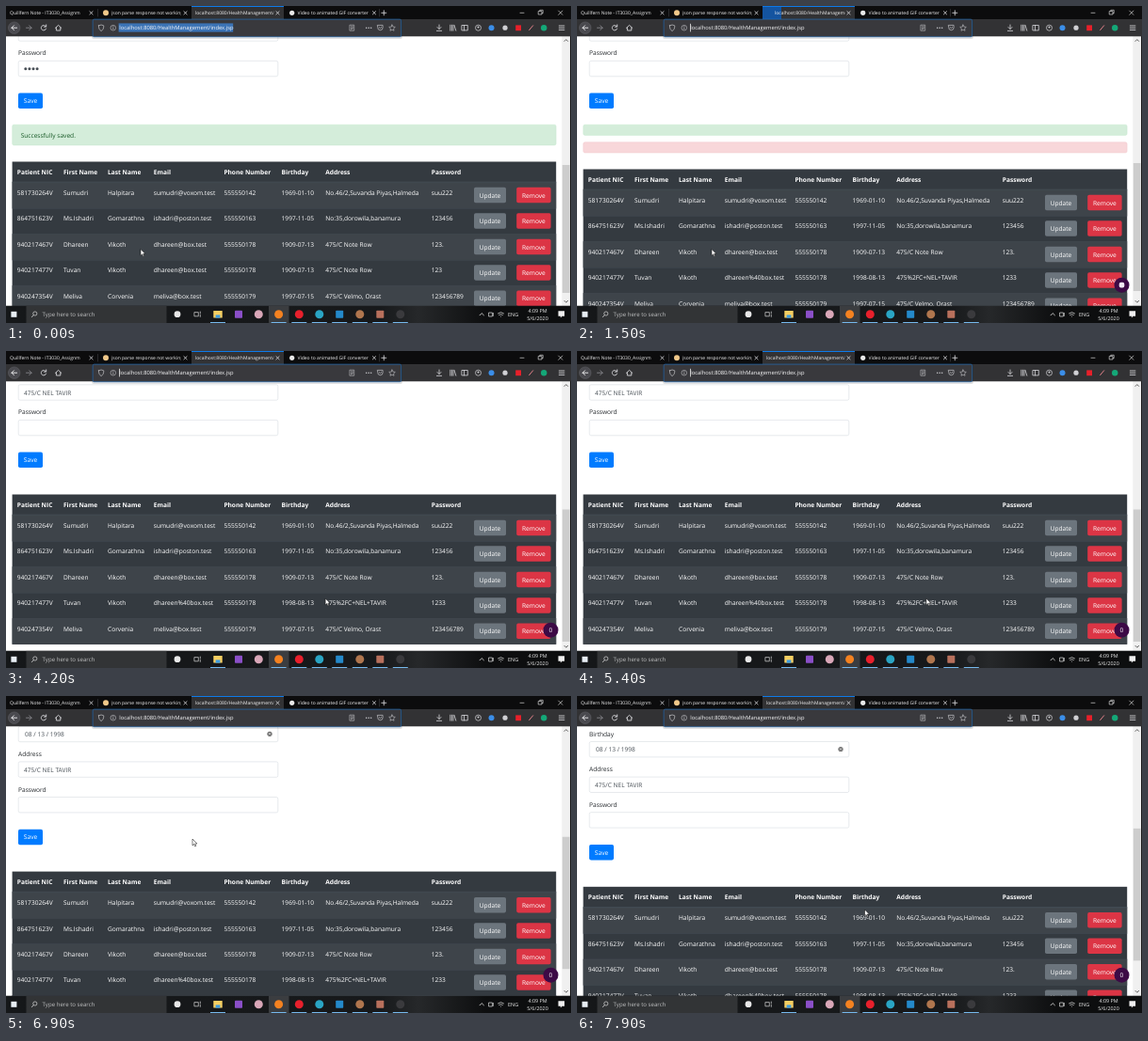
An HTML page for the animation above (8000 ms loop, 600 by 337 pixels).

```html
<!DOCTYPE html>
<html lang="en">
<head>
<meta charset="utf-8">
<title>Patient management</title>
<style>
  html, body { margin: 0; width: 100%; height: 100%; overflow: hidden; background: #fff; }
  svg { display: block; width: 100vw; height: 100vh; }
  text { font-family: "Open Sans", "Noto Sans", sans-serif; text-rendering: geometricPrecision; white-space: pre; }
</style>
</head>
<body>
<svg id="stage" viewBox="0 0 600 337"></svg>
<script>
const LOOP = 8000;
const stage = document.getElementById("stage");

function add(parent, tag, attrs, content) {
  const el = document.createElementNS("http://www.w3.org/2000/svg", tag);
  for (const key in attrs) el.setAttribute(key, attrs[key]);
  if (content !== undefined) el.textContent = content;
  parent.appendChild(el);
  return el;
}
const group = (p, attrs = {}) => add(p, "g", attrs);
const box = (p, x, y, width, height, fill, more = {}) =>
  add(p, "rect", { x, y, width, height, fill, ...more });
const dot = (p, cx, cy, r, fill, more = {}) => add(p, "circle", { cx, cy, r, fill, ...more });
const line = (p, d, stroke = "#d7d7db", width = 0.8) =>
  add(p, "path", { d, stroke, "stroke-width": width, fill: "none", "stroke-linecap": "round", "stroke-linejoin": "round" });
const label = (p, x, y, str, fill, size = 6.6, more = {}) =>
  add(p, "text", { x, y, fill, "font-size": size, ...more }, str);
const show = (el, on) => el.setAttribute("display", on ? "inline" : "none");
const shift = (el, x, y) => el.setAttribute("transform", `translate(${x.toFixed(2)} ${y.toFixed(2)})`);
const defs = add(stage, "defs", {});

// ---- page ----
const INK = "#212529", FIELD = "#495057";
box(stage, 0, 32, 600, 288, "#fff");

// The form is laid out around the middle of the password label.
const form = group(stage);
function field(y, name) {
  label(form, 13, y + 2.4, name, INK);
  box(form, 13.2, y + 8.4, 275.6, 16.4, "#fff", { rx: 1.7, stroke: "#ced4da", "stroke-width": 0.5 });
}
field(-75.2, "Birthday");
field(-37.6, "Address");
field(0, "Password");
label(form, 20, -56.1, "08 / 13 / 1998", FIELD);
dot(form, 280, -58.8, 2.6, "#6b6b6b");
line(form, "M279 -59.8l2 2m0 -2l-2 2", "#fff", 0.6);
label(form, 19, -18.5, "475/C NEL TAVIR", FIELD);
const secret = group(form);
for (let i = 0; i < 4; i++) dot(secret, 20.8 + i * 4.1, 16.8, 1.5, FIELD);
box(form, 13, 42.6, 26, 16.5, "#007bff", { rx: 1.8 });
label(form, 26, 53.4, "Save", "#fff", 6.6, { "text-anchor": "middle" });

const saved = group(stage);
const savedBox = box(saved, 6.7, 126.2, 577.4, 21.8, "#d4edda", { rx: 1.7, stroke: "#c3e6cb", "stroke-width": 0.45 });
const savedText = label(saved, 15.7, 140.2, "Successfully saved.", "#155724");
const failed = box(stage, 6.7, 144.8, 577.4, 11.2, "#f8d7da", { rx: 1.7, stroke: "#f0c4c9", "stroke-width": 0.45 });

const COLS = [11.8, 61, 108, 156.8, 231.4, 292.6, 339.2, 451.8];
const HEAD = ["Patient NIC", "First Name", "Last Name", "Email", "Phone Number", "Birthday", "Address", "Password"];
const ROWS = [
  ["581730264V", "Sumudri", "Halpitara", "sumudri@voxom.test", "555550142", "1969-01-10", "No.46/2,Suvanda Piyas,Halmeda", "suu222"],
  ["864751623V", "Ms.Ishadri", "Gomarathna", "ishadri@poston.test", "555550163", "1997-11-05", "No:35,dorowila,banamura", "123456"],
  ["940217467V", "Dhareen", "Vikoth", "dhareen@box.test", "555550178", "1909-07-13", "475/C Note Row", "123."],
  ["940217477V", "Tuvan", "Vikoth", "dhareen@box.test", "555550178", "1909-07-13", "475/C Note Row", "123"],
  ["940247354V", "Meliva", "Corvenia", "meliva@box.test", "555550179", "1997-07-15", "475/C Velmo, Orast", "123456789"]
];
const EDITED = { 3: "dhareen%40box.test", 5: "1998-08-13", 6: "475%2FC+NEL+TAVIR", 7: "1233" };
const HEAD_H = 22.1, ROW_H = 27.45;

const table = group(stage);
box(table, 6.6, 0, 577.6, HEAD_H + ROW_H * ROWS.length, "#343a40");
HEAD.forEach((h, i) => label(table, COLS[i], 13.5, h, "#fff", 6.6, { "font-weight": 700 }));
box(table, 6.6, HEAD_H - 0.9, 577.6, 0.9, "#454d55");

function button(y, x, w, name, fill) {
  box(table, x, y, w, 16.5, fill, { rx: 1.8 });
  label(table, x + w / 2, y + 10.8, name, "#fff", 6.6, { "text-anchor": "middle" });
}
const cells = ROWS.map((row, r) => {
  const y = HEAD_H + r * ROW_H;
  if (r % 2 === 0) box(table, 6.6, y, 577.6, ROW_H, "#3e444a");
  box(table, 6.6, y, 577.6, 0.45, "#454d55");
  button(y + 5.2, 497, 34, "Update", "#6c757d");
  button(y + 5.2, 542.2, 36.4, "Remove", "#dc3545");
  return row.map((str, i) => label(table, COLS[i], y + 13.4, str, "#fff"));
});

// scrollbar
box(stage, 590.3, 32, 9.7, 287, "#f0f0f0");
line(stage, "M593 37.4l1.8 -1.8l1.8 1.8M593 313.4l1.8 1.8l1.8 -1.8", "#505050", 0.9);
const thumb = box(stage, 590.8, 0, 7.8, 140, "#cdcdcd");
box(stage, 599, 0, 1, 319, "#1a1a1c");

// floating badge
const badge = group(stage);
dot(badge, 578.5, 296.7, 8, "#3d0a46");
const mascot = box(badge, 575.7, 293.8, 5.6, 5.8, "#f3e9f5", { rx: 2 });
const count = label(badge, 578.5, 299.1, "0", "#fff", 6.6, { "text-anchor": "middle" });

// ---- browser chrome ----
box(stage, 0, 0, 600, 14, "#0c0c0d");
box(stage, 0, 14, 600, 18.3, "#323234");
box(stage, 197, 0, 98, 14, "#323234");
box(stage, 197, 0, 98, 0.9, "#0a84ff");

function clip(id, x, w) {
  box(add(defs, "clipPath", { id }), x, 0, w, 14, "#000");
  return `url(#${id})`;
}
function tab(x, w, str, closeX) {
  const g = group(stage);
  const text = label(group(g, { "clip-path": clip("tab" + x, x, w) }), x, 9.2, str, "#f4f4f5", 5);
  line(g, `M${closeX - 1.6} 5.7l3.2 3.2m0 -3.2l-3.2 3.2`, "#e0e0e4", 0.8);
  return text;
}
const pulse = box(stage, 197, 0.9, 20, 13.1, "#0a5fc4", { opacity: 0.75 });
tab(4, 82, "Quillfern Note - IT3030_Assignm", 90.5);
dot(stage, 106, 7.3, 3, "#f0c88a");
tab(112, 73.5, "json parse response not working", 190.5);
const title = tab(201, 83.5, "localhost:8080/HealthManagement/", 288.5);
dot(stage, 303.7, 7.3, 2.6, "#e8e8e8");
tab(309.5, 76, "Video to animated GIF converter", 391);
line(stage, "M97.5 3.5v7.5M396.5 3.5v7.5", "#4a4a4f", 0.5);
line(stage, "M398.8 7.3h5m-2.5 -2.5v5", "#e4e4e6", 0.8);
line(stage, "M546 7.3h4M565.6 5.6h3.4v3.4h-3.4zM566.8 5.4v-1.1h3.4v3.4h-1M586.7 5.1l4.2 4.2m0 -4.2l-4.2 4.2", "#f0f0f0", 0.6);

// navigation
dot(stage, 8.7, 23.2, 6.3, "#4a4a4f", { stroke: "#6a6a6f", "stroke-width": 0.4 });
line(stage, "M11.6 23.2h-5.6m2.4 -2.4l-2.4 2.4l2.4 2.4", "#f4f4f5", 0.9);
line(stage, "M21.5 23.2h5.6m-2.4 -2.4l2.4 2.4l-2.4 2.4", "#85858a", 0.9);
line(stage, "M42.3 21.7a2.7 2.7 0 1 0 .3 2.4M42.7 19.9v2.2h-2.2", "#d7d7db", 0.9);
line(stage, "M52.4 23.4l3.2 -3l3.2 3M53.4 23v3h4.4v-3", "#d7d7db", 0.9);

// address bar
box(stage, 91, 14, 330, 21, "#000", { opacity: 0.12, rx: 2 });
box(stage, 92.1, 14.1, 327.6, 18.7, "#39393d", { rx: 1.6, stroke: "#1f74c9", "stroke-width": 0.6 });
line(stage, "M98.4 20.9l2.7 -.9l2.7 .9c0 3 -.9 4.6 -2.7 5.7c-1.8 -1.1 -2.7 -2.7 -2.7 -5.7z", "#c4c4c8", 0.7);
dot(stage, 113.8, 23.2, 2.8, "none", { stroke: "#c4c4c8", "stroke-width": 0.6 });
line(stage, "M113.8 22.9v1.6m0 -3v.05", "#c4c4c8", 0.7);
const selection = box(stage, 119.6, 18.4, 121.6, 9.2, "#3b73b5");
label(stage, 120.3, 25.4, "localhost:8080/HealthManagement/index.jsp", "#f9f9fa", 5.8);
const caret = box(stage, 120, 18.8, 0.7, 8.6, "#fff");
line(stage, "M365.3 20.2h4.4v6h-4.4zM366.4 21.9h2.2m-2.2 1.4h2.2m-2.2 1.4h1.4", "#c4c4c8", 0.6);
for (let i = 0; i < 3; i++) dot(stage, 382.7 + i * 2.5, 23.2, 0.7, "#d7d7db");
line(stage, "M394.7 20.4h5.4v2.6a2.7 2.7 0 0 1 -5.4 0zM396.1 22.4l1.3 1.2l1.3 -1.2", "#c4c4c8", 0.7);
line(stage, "M410 20l1 2.1l2.3 .3l-1.7 1.6l.4 2.3l-2 -1.1l-2 1.1l.4 -2.3l-1.7 -1.6l2.3 -.3z", "#c4c4c8", 0.6);

// toolbar icons
line(stage, "M460 20v4.4m-2 -1.9l2 2l2 -2M457.4 26.4h5.2", "#d7d7db", 0.8);
line(stage, "M471.8 20.2v6m1.6 -6v6m1.6 -6v6m1 -5.8l1.8 5.8", "#d7d7db", 0.8);
line(stage, "M484.3 20.5h6v5.4h-6zM486.5 20.5v5.4", "#d7d7db", 0.8);
dot(stage, 501.5, 23.2, 3, "none", { stroke: "#d7d7db", "stroke-width": 0.7 });
dot(stage, 501.5, 22.4, 1, "#d7d7db");
dot(stage, 515.5, 23.2, 3, "#3b8ee8");
dot(stage, 530, 23.2, 2.6, "#d0d0d4");
box(stage, 541.2, 20.4, 5.8, 5.8, "#e8202a");
line(stage, "M555.6 25.6l4 -4.8", "#e08088", 1);
dot(stage, 571.2, 23.2, 3.2, "#14a878");
line(stage, "M587.3 21h5.6m-5.6 2.2h5.6m-5.6 2.2h5.6", "#e4e4e6", 0.8);

// ---- taskbar ----
const glass = add(defs, "linearGradient", { id: "glass" });
for (const [offset, color] of [[0, "#151719"], [0.66, "#17191b"], [0.73, "#26282a"], [0.85, "#0d0e0f"]])
  add(glass, "stop", { offset, "stop-color": color });
box(stage, 0, 318.7, 600, 18.3, "url(#glass)");
box(stage, 5.4, 324.8, 6, 6, "#e8eef4");
box(stage, 21.5, 318.9, 149, 18.1, "#323436");
dot(stage, 30.8, 327, 2.1, "none", { stroke: "#d8d8d8", "stroke-width": 0.7 });
line(stage, "M29.3 328.6l-1.9 2", "#d8d8d8", 0.8);
label(stage, 38.6, 330, "Type here to search", "#c0c1c2", 6.1);
dot(stage, 182, 327.7, 3.4, "#e8e8e8");
line(stage, "M200.3 325.6h4v4.2h-4zM206.3 325v2m0 1.4v2", "#d8d8d8", 0.7);
box(stage, 279, 318.7, 21.5, 18.3, "#3b3d40");

box(stage, 220.3, 324, 9.4, 7.6, "#f6cf62", { rx: 0.6 });
box(stage, 222.6, 328.4, 4.8, 3.2, "#3f9ee0");
const APPS = [
  [247, "#8a4fc8", 1], [268.3, "#d9a7b8", 0], [289.6, "#f58220", 0], [311.3, "#e8202c", 0],
  [332.8, "#2aa5c4", 0], [354.2, "#2489ca", 1], [375.8, "#b0764e", 0], [397.3, "#b8705c", 1], [418.8, "#3a3a3d", 0]
];
for (const [x, fill, square] of APPS) {
  if (square) box(stage, x - 4, 323.8, 8, 8, fill, { rx: 0.8 });
  else dot(stage, x, 327.8, 4.5, fill);
}
for (const x of [225, 289.6, 311.3, 332.8, 354.2, 375.8, 397.3, 418.8])
  box(stage, x - 8, 336, 16, 1, "#76b9ed");

line(stage, "M503 328.8l2.2 -2.2l2.2 2.2", "#e8e8e8", 0.8);
line(stage, "M513 326h3.4v4h-3.4zM517.4 326.4v3", "#e0e0e0", 0.7);
line(stage, "M522.5 326.8q3 -2.6 6 0M523.6 328.4q1.9 -1.6 3.8 0M525.5 330v.1", "#e8e8e8", 0.7);
label(stage, 533, 330, "ENG", "#f0f0f0", 5.5);
label(stage, 564.5, 326.2, "4:09 PM", "#f0f0f0", 5.4, { "text-anchor": "middle" });
label(stage, 564.5, 334.2, "5/6/2020", "#f0f0f0", 5.4, { "text-anchor": "middle" });
add(stage, "path", { d: "M586.5 324.2h6.6v5.6h-2.6l-1.6 1.8v-1.8h-2.4z", fill: "#f0f0f0" });

const pointer = add(stage, "path", {
  d: "M0 0v6.9l1.6 -1.5l1.1 2.5l1.1 -.5l-1.1 -2.4h2.2z",
  fill: "#fff", stroke: "#000", "stroke-width": 0.5, "stroke-linejoin": "round"
});

// ---- motion ----
const PATH = [ // time, x, y
  [0, 143, 258.5], [1850, 143, 258.5], [2150, 148, 265.5], [2500, 160, 267], [3100, 215, 268],
  [3700, 302, 265], [4150, 339, 263], [4700, 345, 263], [5500, 372, 263], [6300, 199, 153],
  [6600, 198, 152], [7250, 198, 152], [7850, 305.5, 227]
];
const RELOAD = 900, SWAP = 1100, READY = 1700, LOADED = 1950, COUNTED = 3000;

function pathAt(t) {
  let i = PATH.length - 1;
  while (PATH[i][0] > t) i--;
  const a = PATH[i], b = PATH[i + 1];
  if (!b) return [a[1], a[2]];
  const p = (t - a[0]) / (b[0] - a[0]);
  const k = p * p * (3 - 2 * p);
  return [a[1] + (b[1] - a[1]) * k, a[2] + (b[2] - a[2]) * k];
}
function scrollAt(t) {
  const p = Math.min(1, Math.max(0, (t - 6750) / 480));
  return 50.3 * (1 - (1 - p) ** 3);
}

function render(t) {
  const before = t < SWAP, ready = t >= READY, scroll = scrollAt(t);
  shift(form, 0, ready ? 65 + scroll : 50);
  shift(table, 0, ready ? 152.5 + scroll : before ? 165.5 : 173.5);
  thumb.setAttribute("y", ready ? 168.5 - scroll * 0.55 : before ? 169 : 167);
  thumb.setAttribute("height", ready ? 140.5 : 136);

  show(secret, before);
  show(saved, !ready);
  show(savedText, before);
  savedBox.setAttribute("height", before ? 21.8 : 11.2);
  show(failed, !before && !ready);
  for (const i in EDITED) cells[3][i].textContent = before ? ROWS[3][i] : EDITED[i];

  const loading = t >= RELOAD && t < LOADED;
  show(pulse, loading);
  title.setAttribute("x", loading ? 210 : 201);
  show(selection, t < RELOAD);
  const beat = t % 1000;
  show(caret, t >= RELOAD && beat >= 180 && beat < 720);

  show(badge, t >= 1300);
  show(mascot, t < COUNTED);
  show(count, t >= COUNTED);
  shift(pointer, ...pathAt(t));
}

const start = performance.now();
function tick() {
  render((performance.now() - start) % LOOP);
  requestAnimationFrame(tick);
}
render(0);
requestAnimationFrame(tick);
</script>
</body>
</html>
```
